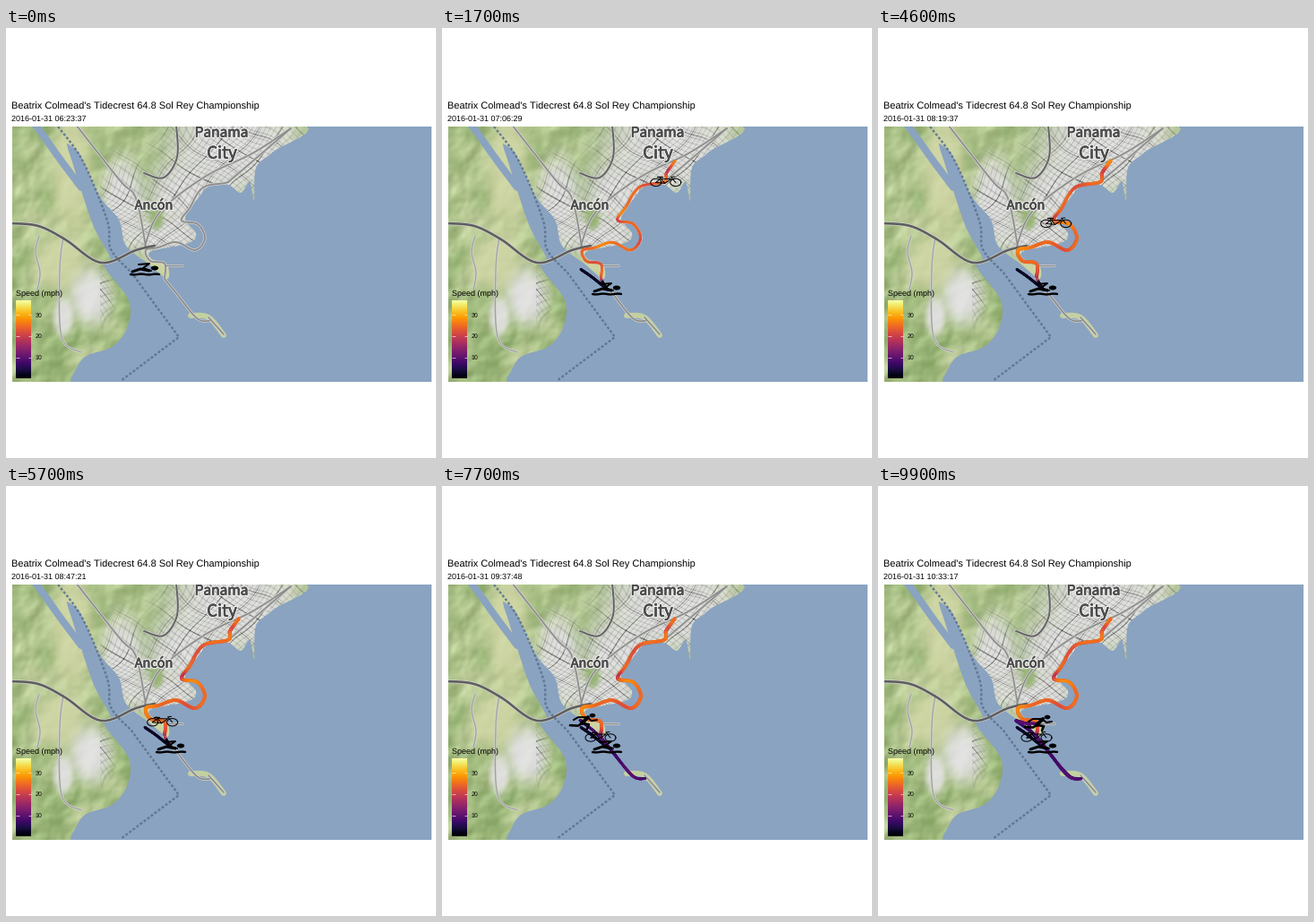
Recreate the animation shown at these times as a matplotlib script. Size 480x480 px, loop 10 s.

```python
import numpy as np
import matplotlib
import matplotlib.pyplot as plt
import matplotlib.patheffects as pe
from matplotlib.animation import FuncAnimation
from matplotlib.collections import LineCollection
from matplotlib.path import Path
from matplotlib.transforms import Affine2D

matplotlib.rcParams.update({"font.family": "Liberation Sans", "text.hinting": "none",
                            "text.hinting_factor": 1})

SIZE, FRAMES, SUB = 480, 100, 12
LEFT, RIGHT, TOP, BOTTOM = 7, 475, 110, 395
W, H = RIGHT - LEFT, BOTTOM - TOP
WATER = "#8aa3c1"
START, SPAN = 6 * 3600 + 23 * 60 + 37, 14980
MAX_MPH = 36.8
TITLE = "Beatrix Colmead's Tidecrest 64.8 Sol Rey Championship"

rng = np.random.default_rng(7)

fig = plt.figure(figsize=(SIZE / 72, SIZE / 72), dpi=72, facecolor="white")
ax = fig.add_axes([LEFT / SIZE, 1 - BOTTOM / SIZE, W / SIZE, H / SIZE])
ax.set(xlim=(LEFT, RIGHT), ylim=(BOTTOM, TOP), xticks=[], yticks=[], facecolor=WATER)
for spine in ax.spines.values():
    spine.set_visible(False)


def curve(pts, closed=False, n=8):
    """Smooth Catmull-Rom curve through the points."""
    p = np.array(pts, float)
    q = np.vstack([p[-1:], p, p[:2]] if closed else [p[:1], p, p[-1:]])
    t = np.arange(n)[:, None] / n
    parts = [0.5 * (2 * b + (c - a) * t + (2 * a - 5 * b + 4 * c - d) * t**2
                    + (3 * b - a - 3 * c + d) * t**3)
             for a, b, c, d in zip(q, q[1:], q[2:], q[3:])]
    return np.vstack(parts + [p[:1] if closed else p[-1:]])


def stroke(pts, color, width, **kw):
    kw.setdefault("solid_capstyle", "round")
    return ax.plot(*np.array(pts, float).T, color=color, lw=width, **kw)[0]


# ---- routes ----
ride = curve([(177, 279), (177, 263), (161, 260), (156, 248), (170, 245), (190, 239),
              (211, 248), (222, 235), (214, 219), (196, 215), (205, 201), (220, 178),
              (248, 172), (250, 162), (260, 148)])
pier = curve([(177, 280), (190, 296), (213, 324), (227, 327)])
west_turn = [(168, 272), (154, 262), (161, 264)]

# ---- terrain ----
EAST = [(325, 107), (297, 139), (279, 156), (277, 194), (272, 172), (262, 184),
        (248, 175), (228, 176), (216, 188), (200, 212), (212, 229), (204, 240),
        (163, 249), (163, 258), (180, 265), (180, 280), (160, 264), (134, 243),
        (126, 214), (104, 187), (82, 140), (62, 107)]
WEST = [(0, 100), (57, 107), (70, 138), (81, 172), (98, 222), (117, 258), (110, 267),
        (137, 304), (135, 335), (118, 356), (88, 367), (74, 388), (64, 400), (0, 402)]
land = Path.make_compound_path(
    *[Path(curve(p, True), closed=True) for p in (EAST, WEST)])

X, Y = np.meshgrid(np.arange(W) + LEFT + 0.5, np.arange(H) + TOP + 0.5)


def noise(scale):
    fy, fx = np.fft.fftfreq(H)[:, None], np.fft.fftfreq(W)[None]
    blur = np.exp(-2 * (np.pi * scale) ** 2 * (fx**2 + fy**2))
    z = np.fft.ifft2(np.fft.fft2(rng.normal(size=(H, W))) * blur).real
    return z / z.std()


GREEN, PALE, SAND, TOWN = np.array(
    [(152, 180, 118), (190, 205, 154), (206, 213, 164), (224, 224, 223)])
# centre, radii and tone of each soft patch
PATCHES = [(74, 160, 24, 75, SAND), (60, 265, 30, 32, SAND), (172, 264, 18, 16, SAND),
           (95, 300, 24, 32, TOWN), (64, 322, 11, 22, TOWN),
           (255, 135, 80, 58, TOWN), (200, 185, 45, 36, TOWN),
           (130, 195, 25, 52, TOWN), (178, 232, 50, 24, TOWN), (168, 213, 8, 13, GREEN)]
mix = np.clip(0.4 + 0.3 * noise(10), 0, 1)[..., None]
ground = GREEN * (1 - mix) + PALE * mix
wild, town = np.ones((H, W, 1)), np.zeros((H, W, 1))
for cx, cy, rx, ry, tone in PATCHES:
    w = np.exp(-(((X - cx) / rx) ** 2 + ((Y - cy) / ry) ** 2) ** 2)[..., None]
    ground += (tone - ground) * w
    wild *= 1 - 0.8 * w
    town += ((tone is TOWN) - town) * w
slope = np.add(*np.gradient(noise(5) + 0.3 * noise(2.5)))
ground += (slope / slope.std() * 8)[..., None] * wild

# warped street grid: fine lanes and wide avenues
warp = 9 * noise(22)
for gap, dark in ((6, 30), (27, 70)):
    for angle in (0.7, 0.7 + np.pi / 2):
        u = (X * np.cos(angle) + Y * np.sin(angle) + warp) / gap
        lane = np.clip(1.1 - gap * np.abs(u - np.round(u)), 0, 1)[..., None]
        ground -= dark * lane * town * (X > 105)[..., None]
ax.imshow(np.clip(ground, 0, 255).astype(np.uint8), extent=(LEFT, RIGHT, BOTTOM, TOP),
          aspect="auto", interpolation="nearest").set_clip_path(land, ax.transData)

stroke(curve([(31, 106), (43, 122), (60, 146), (84, 178)]), WATER, 8)
stroke(curve([(206, 321), (226, 323), (243, 343)]), "#c3d0a0", 6)

# ---- roads: color, width, key points ----
ROADS = [("#a0a0a0", 1.3, [(37, 232), (33, 250), (38, 273), (35, 292)]),
         ("#a0a0a0", 1.3, [(64, 233), (60, 270), (62, 345), (84, 362)]),
         ("#8c8c8c", 1.7, [(78, 108), (127, 170), (145, 190), (156, 244)]),
         ("#8c8c8c", 1.7, [(155, 243), (172, 205), (222, 166), (275, 140), (318, 112)]),
         ("#8c8c8c", 1.7, [(318, 112), (282, 143), (248, 172)]),
         ("#8c8c8c", 1.7, [(226, 323), (236, 334), (243, 342)]),
         ("#8c8c8c", 1.2, [(178, 265), (197, 265)]),
         ("#646464", 2, [(190, 108), (191, 144), (176, 167), (154, 162)]),
         ("#5e5e5e", 2.6, [(5, 218), (36, 221), (66, 236), (106, 262), (145, 248), (166, 243)])]
ROADS = [(c, w, curve(p)) for c, w, p in ROADS] + [("#8c8c8c", 1.8, ride[:-16]),
                                                  ("#8c8c8c", 1.8, pier)]
for _, width, road in ROADS:
    stroke(road, "#d6d6d3", width + 1.3)
for color, width, road in ROADS:
    stroke(road, color, width)

ferry = np.vstack([curve([(58, 110), (86, 149), (113, 215), (117, 247), (140, 273)]),
                   [(193, 345), (128, 394)]])
stroke(ferry, "#5c7390", 2.4, linestyle=(0, (1.2, 0.9)), dash_capstyle="butt", alpha=0.9)

halo = [pe.withStroke(linewidth=3, foreground="#ececec"),
        pe.withStroke(linewidth=0.7, foreground="#4c4c4c")]
for x, y, name, size in ((240.5, 121.5, "Panama", 15.5), (241, 145.5, "City", 18.5),
                         (165, 202.5, "Ancón", 14.5)):
    ax.text(x, y, name, size=size, family="Noto Sans CJK JP", color="#4c4c4c",
            ha="center", va="baseline", clip_on=True, path_effects=halo)

# ---- race ----
STAGES = [  # path, begin, end (in frames)
    (np.array([(155, 269), (184, 291)]), 0, 7),
    (np.array([(184, 291), (177, 280)]), 7, 7.9),
    (np.vstack([ride, ride[::-1]] * 3), 7.9, 57.6),
    (np.vstack([pier, pier[::-1], west_turn, [(169, 267), (169, 272)],
                pier, pier[::-1], west_turn, [(179, 265)]]), 59.8, 99)]


def along(path, share):
    s = np.r_[0, np.cumsum(np.hypot(*np.diff(path, axis=0).T))]
    d = np.clip(share, 0, 1) * s[-1]
    return np.column_stack([np.interp(d, s, axis) for axis in path.T])


def ride_speed(share):
    """Steady pace that drops at the start, the corner and the far turn."""
    lap = share * 6
    u = 1 - np.abs(1 - lap % 2)
    slow = sum(np.exp(-((u - at) / 0.02) ** 2) for at in (0, 0.62, 0.94))
    return 24.5 + 1.8 * np.sin(17 * u - 3.5 + 0.4 * lap) + np.sin(50 * u + lap) - 6 * slow


T = np.arange((FRAMES - 1) * SUB + 1) / SUB
shares = [(T - a) / (b - a) for _, a, b in STAGES]
spots = [along(path, share) for (path, _, _), share in zip(STAGES, shares)]
track = spots[0].copy()
for share, spot in zip(shares, spots):
    track[share >= 0] = spot[share >= 0]
riding = (shares[2] >= 0) & (shares[2] <= 1)
running = shares[3] >= 0
mph = np.where(riding, ride_speed(shares[2]),
               np.where(running, 8.2 + 1.2 * np.sin(1.3 * T), 2.4))
line = track + 0.45 * np.column_stack([np.sin(0.9 * T), np.cos(0.7 * T)])
segments = np.stack([line[:-1], line[1:]], axis=1)
tints = plt.cm.inferno(mph[1:] / MAX_MPH)
trail = LineCollection([], linewidths=3, capstyle="round", zorder=4)
ax.add_collection(trail, autolim=False)


# ---- icons ----
def icon(strokes, discs=(), rings=()):
    """Black pictogram around the origin; returns its shift and its parts."""
    move = Affine2D()
    kw = dict(transform=move + ax.transData, zorder=6)
    parts = [stroke(p, "black", w, **kw) for w, p in strokes]
    a = np.linspace(0, 2 * np.pi, 30)
    for x, y, rx, ry in discs:
        parts += ax.fill(x + rx * np.cos(a), y + ry * np.sin(a), color="black", lw=0, **kw)
    for x, y, rx, ry in rings:
        parts += ax.plot(x + rx * np.cos(a), y + ry * np.sin(a), color="black", lw=1, **kw)
    return move, parts


wave = np.linspace(-16, 16, 25)
swim = icon([(2, [(-7, -5), (5, -6), (-2, -1), (7, 2)]),
             (3, [(-14, 3), (-5, 0), (5, 2)]),
             (2.4, np.column_stack([wave, 6 + 0.4 * np.sin(wave / 2.6)]))],
            discs=[(11, -1, 4.2, 2.5)])
bike = icon([(1, [(-11, 2), (-6, -2), (6, -2), (-1, 3), (-11, 2)]),
             (1, [(-1, 3), (-7, -4)]), (1.4, [(-10, -4), (-4, -4)]),
             (1, [(11, 2), (6, -4), (10, -4.5)])],
            rings=[(s * 11, 2, 6, 4.2) for s in (-1, 1)])
run = icon([(4, [(5, -5), (-2, 2)]),
            (2, [(-11, -2), (-6, -5), (4, -5), (9, -1), (15, -2)]),
            (2.6, [(-15, 4), (-6, 4.5), (-2, 2), (6, 3), (4, 8)])],
           discs=[(10, -7, 3.4, 2.3)])
RACERS = [(swim, 0), (bike, 2), (run, 3)]

# ---- legend and titles ----
ramp = plt.cm.inferno(np.linspace(1, 0, 256))[:, None]
ax.imshow(ramp, extent=(11.3, 28.3, 390.6, 304.4), aspect="auto", zorder=7)
ax.text(11, 299, "Speed (mph)", size=9, zorder=8)
for value in (10, 20, 30):
    y = 391.2 - 2.37 * value
    for x in (11.3, 24.9):
        stroke([(x, y), (x + 3.4, y)], "white", 0.6, solid_capstyle="butt", zorder=8)
    ax.text(32.7, y + 2.6, str(value), size=7.2, zorder=8)
ax.text(6.5, 91, TITLE, size=10.8, clip_on=False)
clock = ax.text(6.5, 104, "", size=9, clip_on=False)


def draw(k):
    now = START + int(k * SPAN / (FRAMES - 1))
    clock.set_text(f"2016-01-31 {now // 3600:02d}:{now // 60 % 60:02d}:{now % 60:02d}")
    trail.set_segments(segments[:k * SUB])
    trail.set_color(tints[:k * SUB])
    for (move, parts), stage in RACERS:
        move.clear().translate(*spots[stage][k * SUB])
        for part in parts:
            part.set_visible(k >= STAGES[stage][1])
    return []


anim = FuncAnimation(fig, draw, frames=FRAMES, interval=100, repeat=True, repeat_delay=0)
plt.show()
```
